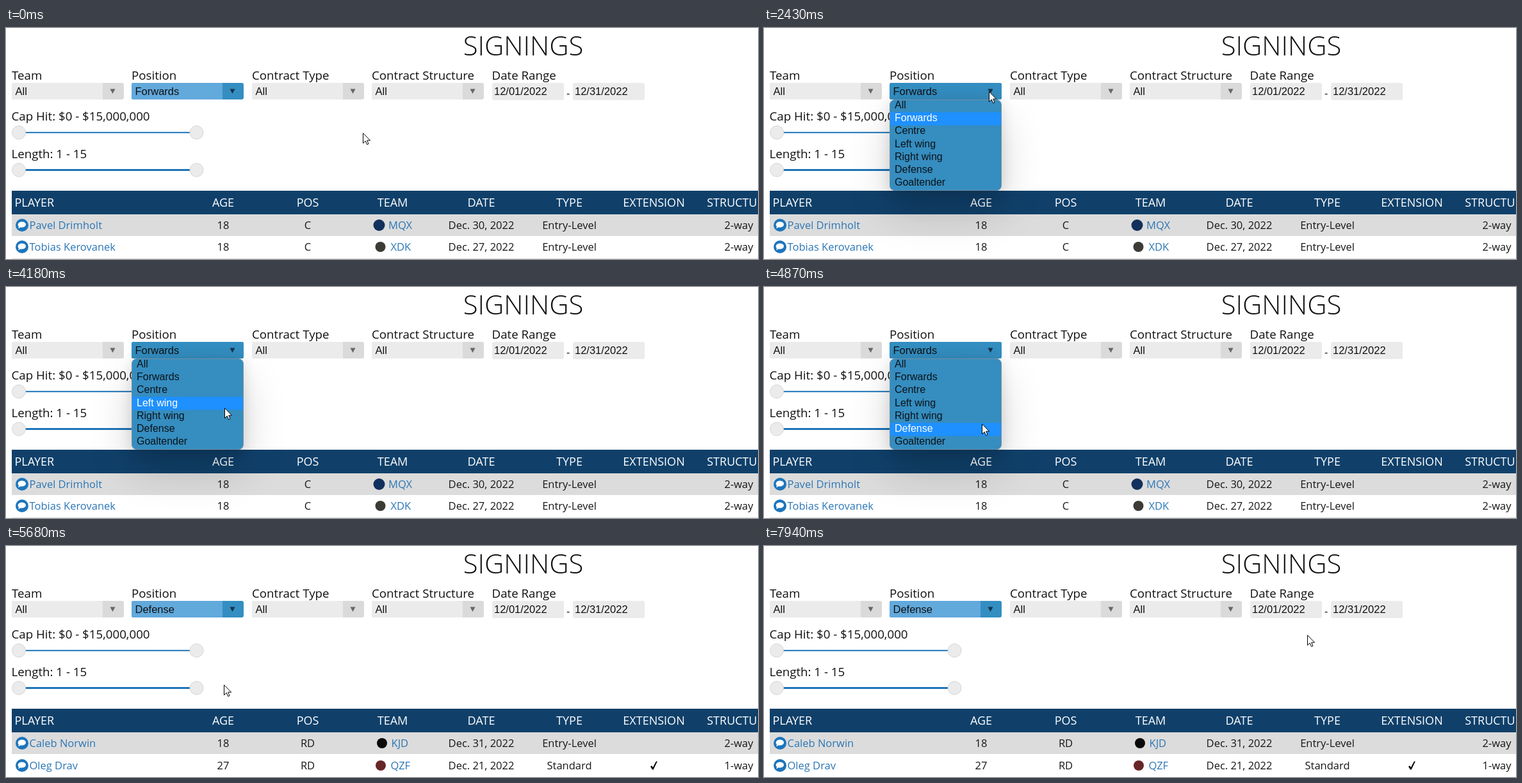
These frames come from a looping animation (1174x362 px, 8000 ms). An HTML page:

```html
<!DOCTYPE html>
<html lang="en">
<head>
<meta charset="utf-8">
<title>Signings</title>
<style>
html, body { margin: 0; width: 100%; height: 100%; overflow: hidden; background: #fff; }
#stage { position: relative; width: 1174px; height: 362px; overflow: hidden; }
svg { position: absolute; left: 0; top: 0; display: block; }
text { font-family: "Open Sans", sans-serif; white-space: pre; }
.title { font-size: 41.8px; font-weight: 300; fill: #111; }
.label { font-size: 18.72px; fill: #111; }
.field { font: 16.5px "Liberation Sans", Arial, sans-serif; fill: #111; }
.item { font: 16px "Liberation Sans", Arial, sans-serif; fill: #0c1216; }
.item.hot { fill: #fff; }
.head { font-size: 18px; fill: #fff; }
.cell { font-size: 16.5px; fill: #161616; }
.link { font-size: 16.5px; fill: #2b76b5; }
.mid { text-anchor: middle; }
#menu {
  position: absolute; left: 196px; top: 112px; width: 175px; height: 143px;
  box-sizing: border-box; border: 1px solid #7391a5; border-radius: 8px; background: #358dc0;
  box-shadow: 0 32px 64px rgba(0,0,0,.17), 0 2px 21px rgba(0,0,0,.12);
}
</style>
</head>
<body>
<div id="stage">
  <svg id="page" width="1174" height="362"></svg>
  <div id="menu"></div>
  <svg id="top" width="1174" height="362">
    <g id="options"><rect id="bar" x="197" width="173" height="20.5" fill="#1e90ff"/></g>
    <path id="cursor" d="M.5 .8V16.6L4.2 13.1 6.6 18.6 9 17.6 6.7 12.2H11.6Z" fill="#fff" stroke="#000" stroke-linejoin="round"/>
  </svg>
</div>
<script>
const LOOP = 8000, STEP = 69.5;
const ITEM_TOP = 112, ITEM_H = 20.25;
const $ = id => document.getElementById(id);

const text = (cls, x, y, s, id = '') => `<text class="${cls}" x="${x}" y="${y}"${id && ` id="${id}"`}>${s}</text>`;
const rect = (x, y, w, h, fill, extra = '') => `<rect x="${x}" y="${y}" width="${w}" height="${h}" fill="${fill}" ${extra}/>`;
const disc = (x, y, r, fill, extra = '') => `<circle cx="${x}" cy="${y}" r="${r}" fill="${fill}" ${extra}/>`;

function select(x, label, value, active) {
  const [body, side, arrow] = active ? ['#62a9dc', '#348ec1', '#16324a'] : ['#ebebeb', '#dadada', '#666'];
  return text('label', x, 81, label)
    + rect(x, 86, 175, 26, side, 'rx="3"')
    + `<path d="M${x + 142} 86H${x + 3}q-3 0-3 3v20q0 3 3 3H${x + 142}Z" fill="${body}"/>`
    + (active ? rect(x, 86, 175, 26, side, 'rx="3" id="hover"') : '')
    + `<path d="M${x + 153.5} 95.5h8l-4 7.5Z" fill="${arrow}"/>`
    + text('field', x + 5.5, 105, value, active ? 'position' : '');
}

const dateBox = (x, s) => rect(x, 86, 112, 27, '#ebebeb', 'rx="3"') + text('field', x + 3, 105, s);

function slider(label, y, thick) {
  const knob = x => disc(x, y, 10.5, '#ebebeb', 'stroke="#d6d6d6"');
  return text('label', 8.5, y - 18.5, label) + rect(20, y - thick / 2, 277, thick, '#1c74b9') + knob(20) + knob(297.5);
}

const COLUMNS = [339, 471, 742, 879.5, 1144];

function row(y, name, logo, code, cells) {
  return disc(25, y - 6, 10, '#1c75bc')
    + `<path d="M25 ${y - 11.5}c8 0 8 9 0 9q-1.500 0-2.500-.3-1.500 1.500-3.700 1.500 1.200-1 1.100-2.600c-3-3-.5-7.600 5.100-7.600Z" fill="#fff"/>`
    + text('link', 36.5, y, name)
    + disc(...logo) + text('link', code[0], y, code[1])
    + cells.map((s, i) => text('cell mid', COLUMNS[i], y, s)).join('');
}

const heads = [['AGE', 339], ['POS', 471], ['TEAM', 603.5], ['DATE', 742], ['TYPE', 879.5], ['EXTENSION', 1011.5], ['STRUCTURE', 1144]];

$('page').innerHTML = text('title mid', 807.5, 43, 'SIGNINGS')
  + select(9, 'Team', 'All')
  + select(196, 'Position', 'Forwards', true)
  + select(384, 'Contract Type', 'All')
  + select(571, 'Contract Structure', 'All')
  + text('label', 758.5, 81, 'Date Range')
  + dateBox(759, '12/01/2022') + text('cell', 875, 107.5, '-') + dateBox(885, '12/31/2022')
  + slider('Cap Hit: $0 - $15,000,000', 163.8, 2)
  + slider('Length: 1 - 15', 222.5, 3)
  + rect(9, 255, 1165, 37, '#10406a')
  + text('head', 13.5, 280, 'PLAYER')
  + heads.map(([s, x]) => text('head mid', x, 280, s)).join('')
  + rect(9, 292, 1165, 34, '#dcdcdc')
  + '<g id="forwards">'
  + row(315, 'Pavel Drimholt', [582.5, 309, 9, '#12305c'], [597, 'MQX'], ['18', 'C', 'Dec. 30, 2022', 'Entry-Level', '2-way'])
  + row(349, 'Tobias Kerovanek', [584.5, 343, 8, '#3d3b36'], [600.5, 'XDK'], ['18', 'C', 'Dec. 27, 2022', 'Entry-Level', '2-way'])
  + rect(9, 361, 1165, 1, '#dcdcdc')
  + '</g><g id="defense">'
  + row(315, 'Caleb Norwin', [587, 309, 8, '#0a0a0a'], [601.5, 'KJD'], ['18', 'RD', 'Dec. 31, 2022', 'Entry-Level', '2-way'])
  + row(350, 'Oleg Drav', [585, 344, 8, '#672628'], [600.5, 'QZF'], ['27', 'RD', 'Dec. 21, 2022', 'Standard', '1-way'])
  + '<path d="M1006 345.500l2.200-1.200 1.700 2.700 5-9.500h2l-6.300 13h-1.600Z" fill="#000"/></g>';

$('options').insertAdjacentHTML('beforeend',
  ['All', 'Forwards', 'Centre', 'Left wing', 'Right wing', 'Defense', 'Goaltender']
    .map((s, i) => text('item', 204, Math.round(126 + ITEM_H * i - .1), s)).join(''));
const items = [...document.querySelectorAll('.item')];

// pointer path: time, x, y
const PATH = [
  [0, 557, 164], [430, 557, 164], [1264, 375, 113], [1610, 352, 98], [2360, 352, 98], [2430, 351, 99],
  [3194, 347, 144], [3542, 345, 156], [4035, 342, 181], [4654, 340, 211], [4800, 340, 211],
  [4870, 340, 214], [4939, 340, 214], [5075, 340, 217], [6411, 340, 217],
  [7244, 661, 199], [7939, 848, 139], [LOOP, 848, 139]
];
const BURSTS = [0, 500, 1890, 2430, 4870, 5400, 6480];

const slope = (i, k) => (PATH[i + 1][k] - PATH[i][k]) / (PATH[i + 1][0] - PATH[i][0]);

// monotone tangent: no overshoot, zero at rests
function tangent(i, k) {
  if (i === 0 || i === PATH.length - 1) return 0;
  const a = slope(i - 1, k), b = slope(i, k);
  return a * b > 0 ? 2 * a * b / (a + b) : 0;
}

function along(t, k) {
  let i = 0;
  while (i < PATH.length - 2 && t >= PATH[i + 1][0]) i++;
  const p = PATH[i], q = PATH[i + 1], d = q[0] - p[0], u = (t - p[0]) / d, v = 1 - u;
  return v * v * (1 + 2 * u) * p[k] + u * u * (3 - 2 * u) * q[k]
    + d * u * v * (v * tangent(i, k) - u * tangent(i + 1, k));
}

const ramp = (t, a, b) => Math.min(1, Math.max(0, (t - a) / (b - a)));
const show = (id, on) => $(id).style.display = on ? '' : 'none';

function draw(now) {
  const time = now % LOOP;
  const start = BURSTS.filter(b => b <= time).pop();
  const t = start + Math.floor((time - start) / STEP) * STEP;
  const x = Math.round(along(t, 1)), y = Math.round(along(t, 2));
  $('cursor').setAttribute('transform', `translate(${x} ${y})`);

  const fade = ramp(t, 1300, 1600) - ramp(t, 5370, 5670);
  $('hover').setAttribute('opacity', fade);

  const open = time >= 1890 && time < 5400;
  show('menu', open);
  show('options', open);
  $('menu').style.opacity = $('options').style.opacity = time < 1960 ? .6 : 1;
  const hot = y < ITEM_TOP ? 1 : Math.min(6, Math.floor((y - ITEM_TOP) / ITEM_H));
  $('bar').setAttribute('y', Math.round(ITEM_TOP + ITEM_H * hot - .5));
  items.forEach((el, i) => el.classList.toggle('hot', i === hot));

  $('position').textContent = time < 5400 ? 'Forwards' : 'Defense';
  show('forwards', time < 5470);
  show('defense', time >= 5470);
}

function tick() {
  draw(performance.now());
  requestAnimationFrame(tick);
}
tick();
</script>
</body>
</html>
```
